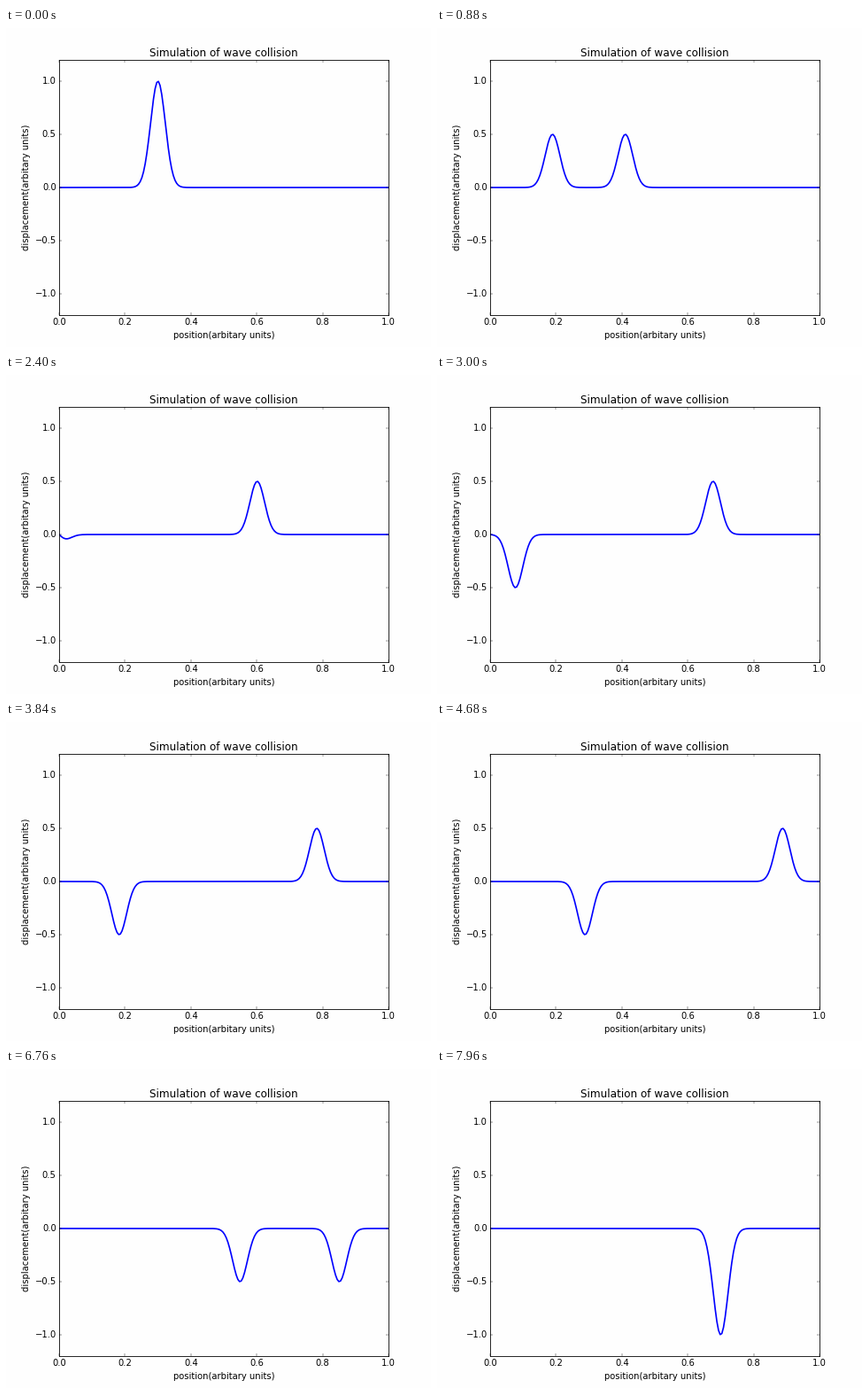
A matplotlib script for the animation above (8000 ms loop, 480x360 px).

```python
import numpy as np
import matplotlib.pyplot as plt
from matplotlib.animation import FuncAnimation

FRAMES = 200
PAPER = "#fefefe"

plt.style.use("classic")
plt.rcParams.update({
    "font.family": "DejaVu Sans",
    "figure.facecolor": PAPER,
    "savefig.facecolor": PAPER,
    "axes.facecolor": PAPER,
    "savefig.dpi": 60,
})

x = np.linspace(0, 1, FRAMES)


def pulse(p):
    return np.exp(-1000 * (p - 0.3) ** 2)


def extended(p):
    """Pulse with inverted mirror images behind the fixed ends."""
    return pulse(p) - pulse(-p) - pulse(2 - p)


def displacement(shift):
    return 0.5 * (extended(x - shift) + extended(x + shift))


fig = plt.figure(figsize=(8, 6), dpi=60)
ax = fig.add_axes([0.125, 0.1, 0.775, 0.8])
ax.set_xlim(0, 1)
ax.set_ylim(-1.2, 1.2)
ax.set_xticks(np.linspace(0, 1, 6))
ax.set_yticks(np.linspace(-1, 1, 5))
ax.set_title("Simulation of wave collision")
ax.set_xlabel("position(arbitary units)")
ax.set_ylabel("displacement(arbitary units)")
line, = ax.plot(x, displacement(0), color="#0000ff", lw=2)


def update(i):
    line.set_ydata(displacement(i / (FRAMES - 1)))
    return line,


anim = FuncAnimation(fig, update, frames=FRAMES, interval=40,
                     repeat=True, repeat_delay=0, blit=False)
plt.show()
```
